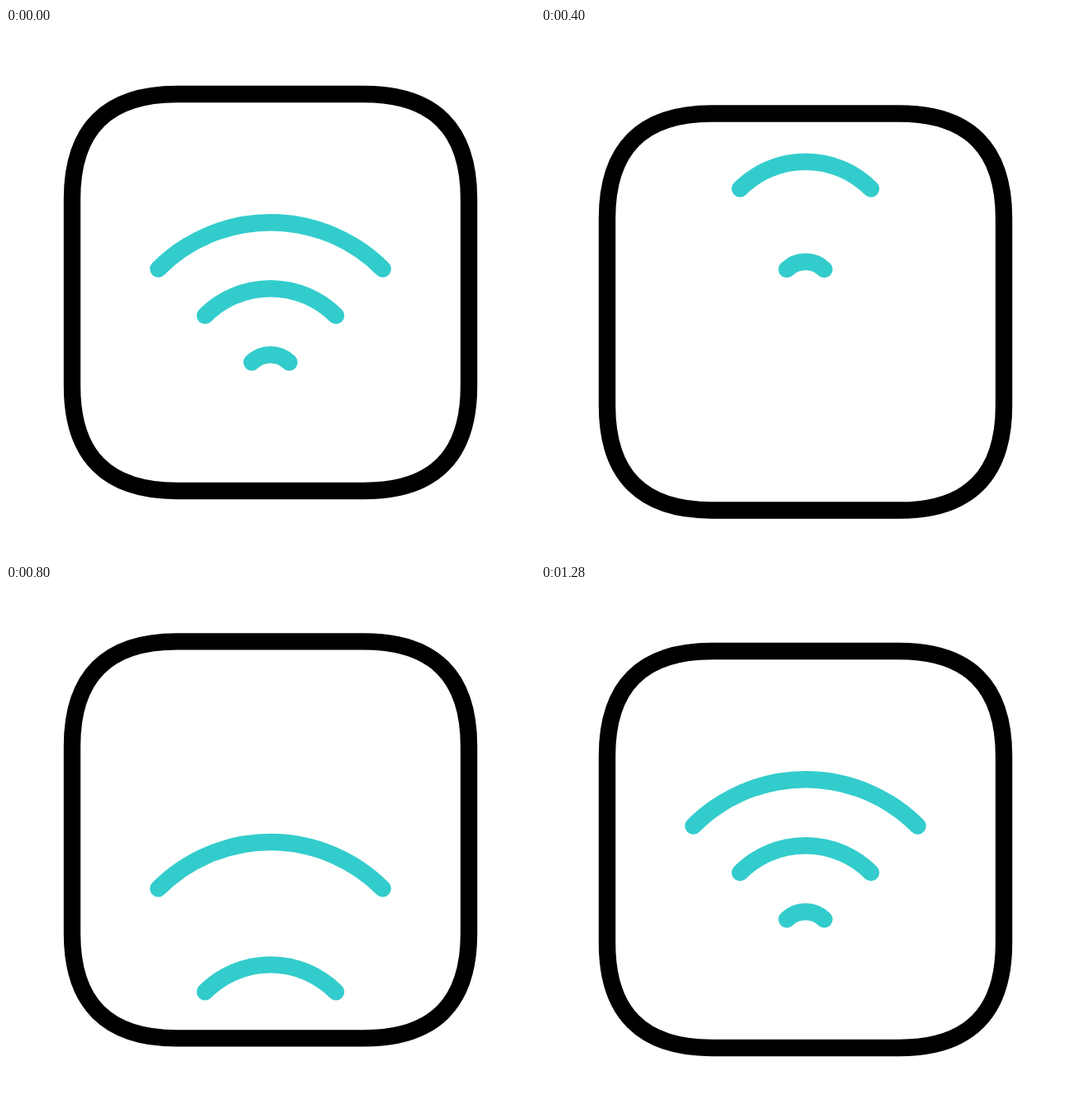
Recreate the animation shown at these times as an HTML page. Size 640 px wide and 640 px high, loop 1.48 s.

```html
<!DOCTYPE html>
<html lang="en">
<head>
<meta charset="utf-8">
<title>Wireless icon</title>
<style>
  html, body { margin: 0; width: 100%; height: 100%; overflow: hidden; background: #fff; }
  svg { display: block; width: 100vw; height: 100vh; }
  path { fill: none; stroke-width: 20.4; stroke-linecap: round; }
  #box { stroke: #000; }
  .arc { stroke: #3cc; }
</style>
</head>
<body>
<svg viewBox="0 0 640 640">
  <defs>
    <clipPath id="inside">
      <path id="hole" d="M206.7 80H433.3Q560 80 560 206.7V433.3Q560 560 433.3 560H206.7Q80 560 80 433.3V206.7Q80 80 206.7 80Z"/>
    </clipPath>
  </defs>
  <g id="waves" clip-path="url(#inside)"></g>
  <path id="box"/>
</svg>
<script>
const LOOP = 1480, STEP = 40, RISE = 480;
const $ = id => document.getElementById(id);
const box = $('box'), hole = $('hole');
box.setAttribute('d', hole.getAttribute('d'));

// Bob of the box: [time, offset], eased in and out between stops
const bob = [[60, 0], [350, 29], [608, -27], [960, 0]];

// Arcs leave upwards from `start`, re-enter from below and settle at `end`
const arcs = [
  { r: 192, start: 75, a: 2.24e-3, b: 6.5e-7, end: 960, from: 292 },
  { r: 112, start: 100, a: 1.9e-3, b: 6.5e-7, end: 1130, from: 222.5 },
  { r: 32, start: 125, a: 1.661e-3, b: 6.3e-7, end: 1270, from: 202 }
];

for (const arc of arcs) {
  const k = arc.r * Math.SQRT1_2, y = 427.2 - k;
  arc.el = document.createElementNS('http://www.w3.org/2000/svg', 'path');
  arc.el.setAttribute('class', 'arc');
  arc.el.setAttribute('d', `M${320 - k} ${y}A${arc.r} ${arc.r} 0 0 1 ${320 + k} ${y}`);
  $('waves').append(arc.el);
}

const smooth = x => x * x * (3 - 2 * x);

// Share of the way still to go, for cubic-bezier(.167, .167, .833, 1)
function remaining(x) {
  let lo = 0, hi = 1;
  for (let i = 0; i < 24; i++) {
    const m = (lo + hi) / 2;
    if (m * (0.5 + m * (1.5 - m)) < x) lo = m; else hi = m;
  }
  return lo * lo * (2.5 - 1.5 * lo);
}

function boxY(t) {
  for (let i = 1; i < bob.length; i++) {
    const [t0, y0] = bob[i - 1], [t1, y1] = bob[i];
    if (t < t1) return y0 + (y1 - y0) * smooth(Math.max(0, (t - t0) / (t1 - t0)));
  }
  return 0;
}

function arcY(arc, t) {
  if (t <= arc.start || t >= arc.end) return 0;
  const left = arc.end - t;
  if (left <= RISE) return arc.from * remaining(left / RISE);
  const s = t - arc.start;
  return -s * s * (arc.a - arc.b * s);
}

const shift = (el, y) => el.setAttribute('transform', `translate(0 ${y.toFixed(2)})`);

function draw(ms) {
  const t = Math.floor((ms % LOOP + 2) / STEP) * STEP % LOOP;
  const y = boxY(t);
  shift(box, y);
  shift(hole, y);
  for (const arc of arcs) shift(arc.el, arcY(arc, t));
}

const t0 = performance.now();
function tick() {
  draw(performance.now() - t0);
  requestAnimationFrame(tick);
}
tick();
</script>
</body>
</html>
```
